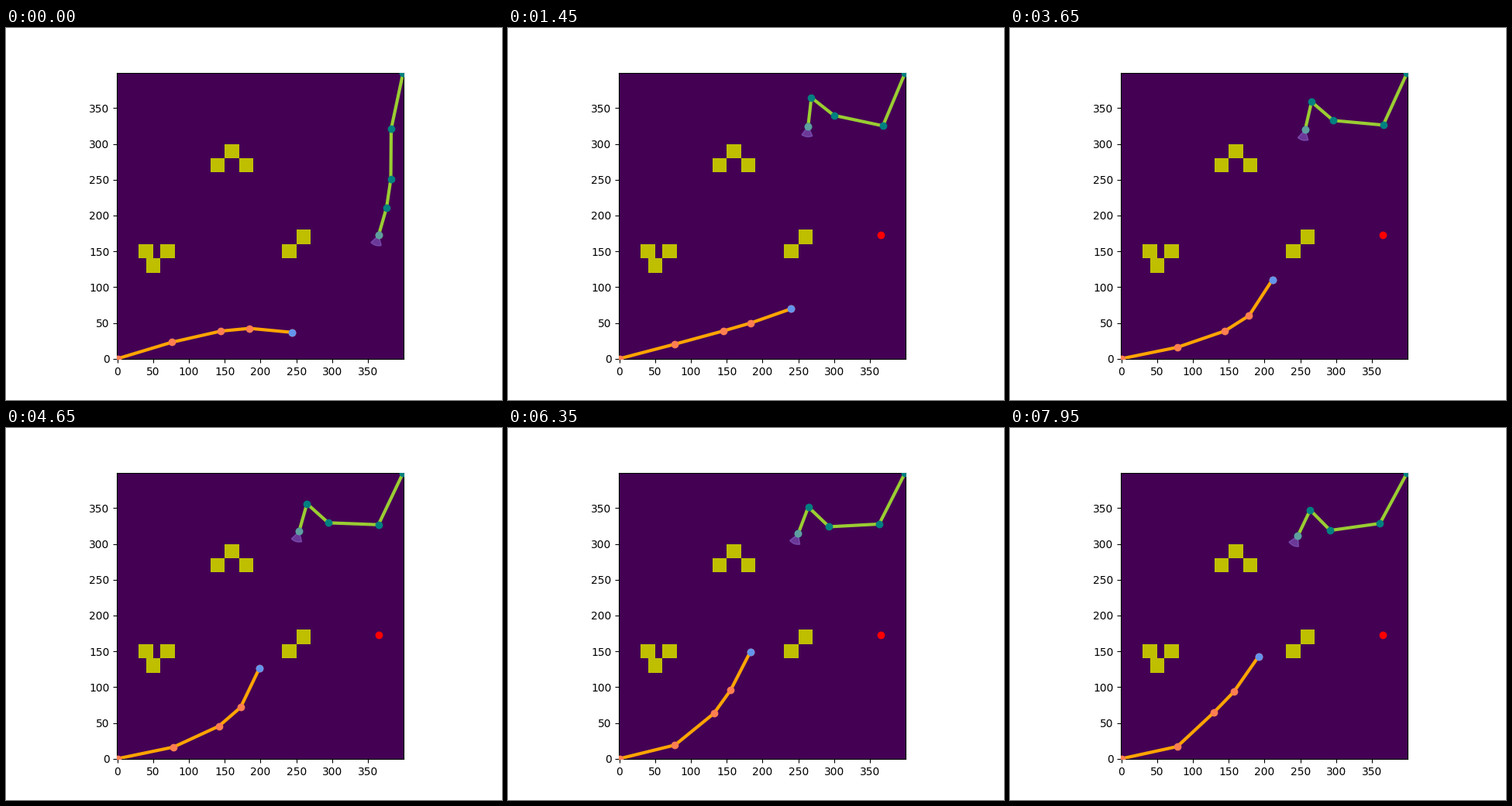
Animation of 640 by 480 pixels, one loop 8 s. Source, as a matplotlib script:

```python
import numpy as np
import matplotlib.pyplot as plt
from matplotlib.animation import FuncAnimation
from matplotlib.patches import Rectangle, Wedge

SIZE = 400
FRAMES = 160
INTERVAL = 50
CELL = 20
LINK = np.arange(4)


def dot(ax, pos, color, zorder):
    return ax.plot(*[[c] for c in pos], "o", color=color, zorder=zorder)[0]


def add_blocks(ax):
    # Three clusters, the middle one raised, each grown from its left cell.
    for i, offsets in enumerate([[(10, -20), (30, 0)],
                                 [(20, 20), (40, 0)],
                                 [(20, 20)]]):
        x, y = 30 + 100 * i, 140 + 120 * (i % 2)
        for dx, dy in [(0, 0)] + offsets:
            ax.add_patch(Rectangle((x + dx, y + dy), CELL, CELL,
                                   facecolor="y", zorder=1))


class Arm:
    """Planar arm whose link headings run linearly between waypoints."""

    def __init__(self, ax, base, links, steps, poses, colors):
        self.base = np.array(base, float)
        self.links = np.array(links, float)
        self.steps = steps
        self.poses = np.array(poses, float)
        line_color, joint_color, tip_color = colors
        self.line, = ax.plot([], [], "o-", color=line_color, lw=3,
                             mfc=joint_color, mec=joint_color, zorder=3)
        self.tip = dot(ax, base, tip_color, 5)

    def move(self, step):
        angles = np.array([np.interp(step, self.steps, col)
                           for col in self.poses.T])
        rad = np.radians(angles)
        offsets = self.links[:, None] * np.column_stack([np.cos(rad), np.sin(rad)])
        points = np.vstack([self.base, self.base + np.cumsum(offsets, axis=0)])
        self.line.set_data(points[:, 0], points[:, 1])
        self.tip.set_data(points[-1:, 0], points[-1:, 1])
        return points[-1], angles[-1]


fig, ax = plt.subplots(figsize=(6.4, 4.8), dpi=100)
ax.imshow(np.zeros((SIZE, SIZE)), origin="lower", cmap="viridis")
ax.set_xticks(range(0, SIZE, 50))
ax.set_yticks(range(0, SIZE, 50))
add_blocks(ax)

# Poses are link headings in degrees, base to tip.
lower = Arm(ax, (0, 0), (80, 70, 40, 60),
            [0, 82, 123.5, 159],
            [16.8 - 2.3 * LINK - 1.7 * LINK**2,
             10.9 * 1.81**LINK,
             14 + 28.7 * LINK - 4.05 * LINK**2,
             (12.3, 43, 46, 55)],
            ("orange", "coral", "cornflowerblue"))
upper = Arm(ax, (399, 399), (80, 70, 40, 40),
            [0, 25.5, 159],
            [(258, 269.6, 261.5, 254),
             (247.4, 167.4, 142, 264),
             (241.7, 188, 134.6, 244.5)],
            ("yellowgreen", "teal", "cadetblue"))

goal, _ = upper.move(0)
dot(ax, goal, "red", 2)
cone = ax.add_patch(Wedge(goal, 15, 0, 60, color="mediumpurple",
                          alpha=0.5, zorder=4))
ax.set(xlim=(-0.5, SIZE - 0.5), ylim=(-0.5, SIZE - 0.5))


def update(step):
    lower.move(step)
    tip, heading = upper.move(step)
    cone.set_center(tip)
    cone.set_theta1(heading - 30)
    cone.set_theta2(heading + 30)
    return lower.line, lower.tip, upper.line, upper.tip, cone


anim = FuncAnimation(fig, update, frames=FRAMES, interval=INTERVAL,
                     init_func=lambda: update(0), repeat=True, repeat_delay=0)
plt.show()
```
